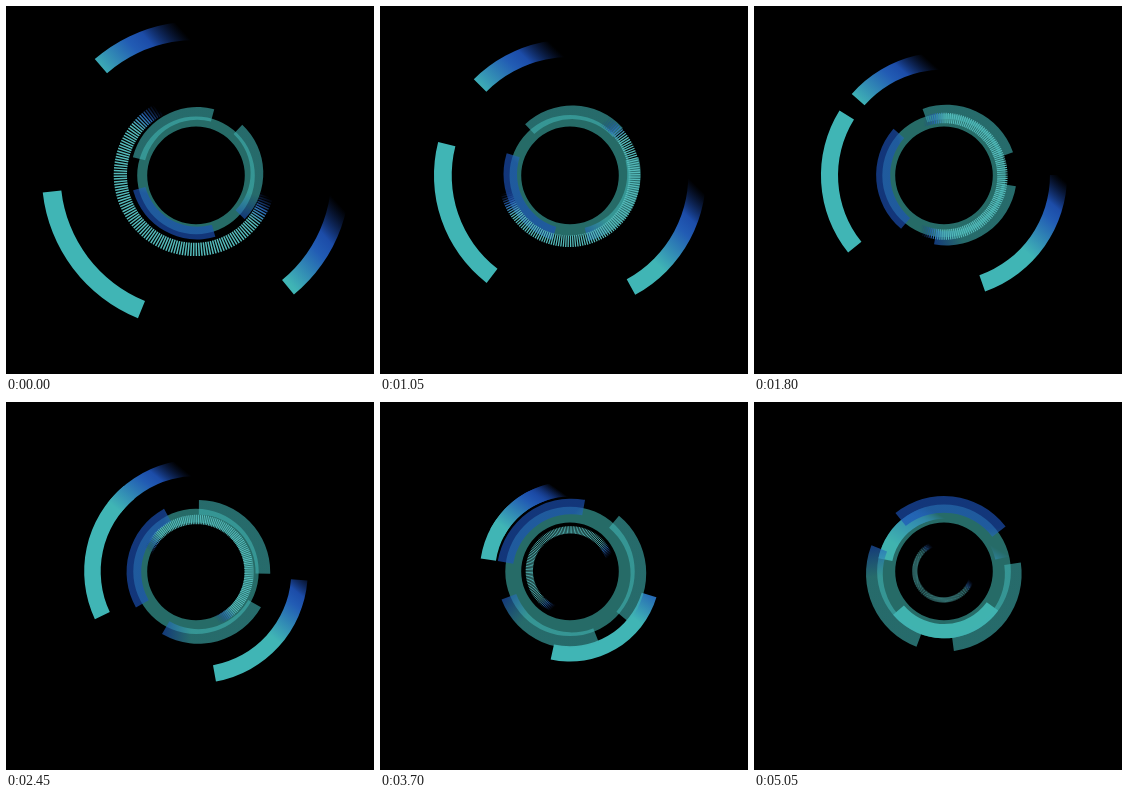
An HTML page with a canvas that plays this animation: 368 px wide and 368 px high, repeating every 5.1 s.

```html
<!DOCTYPE html>
<html lang="en">
<head>
<meta charset="utf-8">
<title>Rotating rings</title>
<style>
  html, body { margin: 0; width: 100%; height: 100%; overflow: hidden; background: #000; }
  canvas { display: block; width: 368px; height: 368px; }
</style>
</head>
<body>
<canvas id="stage" width="368" height="368"></canvas>
<script>
const ctx = document.getElementById('stage').getContext('2d');
const LOOP = 5100, STEP = 50;
const CX = 190, CY = 169.4;
const rad = deg => deg * Math.PI / 180;

// Linear gradient along an axis through the centre; stops are [fraction of r, colour].
function axisGradient(deg, r, stops) {
  const x = Math.cos(rad(deg)) * r, y = Math.sin(rad(deg)) * r;
  const g = ctx.createLinearGradient(-x, -y, x, y);
  for (const [at, colour] of stops) g.addColorStop((at + 1) / 2, colour);
  return g;
}

function band(inner, outer, from, to, fill) {
  ctx.beginPath();
  ctx.arc(0, 0, outer, rad(from), rad(to));
  ctx.arc(0, 0, inner, rad(to), rad(from), true);
  ctx.closePath();
  ctx.fillStyle = fill;
  ctx.fill();
}

// Three opaque arcs that shrink while their span widens.
function outerArcs(t) {
  const outer = 154.2 - 17.3 * t, inner = 135.5 - 16.4 * t;
  const mid = (outer + inner) / 2;
  const span = 61.5 * Math.pow(145 / mid, 0.59);
  const start = -72.5 + 0.9 * t;
  const fade = 0.6 + 0.035 * t;
  const fill = axisGradient(-42 - 3.5 * t, mid, [
    [-0.02, 'rgb(64,181,181)'],
    [fade - 0.33, 'rgb(34,92,180)'],
    [fade - 0.22, 'rgb(28,76,168)'],
    [fade, 'rgba(18,50,130,0)']
  ]);
  for (const from of [start + span, start + 3 * span, start + 363 - span]) {
    band(inner, outer, from, from + span, fill);
  }
}

// Three translucent arcs turning slightly off centre.
function middleArcs(t) {
  const outer = 66.2 + 2.3 * t, inner = 53.5 + 1.5 * t;
  ctx.save();
  ctx.rotate(rad(31.2 * t));
  ctx.translate(1.1, -2.2);
  const fill = axisGradient(105, outer, [
    [0.08, 'rgba(64,178,178,.6)'],
    [0.5, 'rgba(28,82,185,.66)']
  ]);
  for (const from of [74, 194, 313]) band(inner, outer, from, from + 91, fill);
  ctx.restore();
}

function baseRing(t) {
  ctx.beginPath();
  ctx.arc(0, 0, 58.8 + 1.6 * t, 0, 2 * Math.PI);
  ctx.arc(0, 0, 48.8, 0, 2 * Math.PI, true);
  ctx.fillStyle = 'rgba(64,178,172,.6)';
  ctx.fill();
}

function tickRing(t) {
  const scale = 1 - 0.1215 * t, step = 2;
  ctx.save();
  ctx.rotate(rad(-70.6 * t));
  ctx.scale(scale, scale);
  ctx.translate(-1, -0.6);
  ctx.beginPath();
  for (let a = 15; a < 243; a += step) {
    const c = Math.cos(rad(a)), s = Math.sin(rad(a));
    ctx.moveTo(68 * c, 68 * s);
    ctx.lineTo(81.3 * c, 81.3 * s);
  }
  ctx.lineWidth = 1.5;
  ctx.strokeStyle = axisGradient(-51.5, 75, [
    [0, 'rgb(84,186,186)'],
    [0.19, 'rgb(40,100,176)'],
    [0.38, 'rgba(20,50,130,0)']
  ]);
  ctx.stroke();
  ctx.restore();
}

function draw(now) {
  const t = Math.floor((now % LOOP) / STEP) * STEP / 1000;
  ctx.setTransform(1, 0, 0, 1, 0, 0);
  ctx.fillStyle = '#000';
  ctx.fillRect(0, 0, 368, 368);
  ctx.translate(CX, CY);
  outerArcs(t);
  baseRing(t);
  middleArcs(t);
  tickRing(t);
}

const begin = performance.now();
function tick() {
  draw(performance.now() - begin);
  requestAnimationFrame(tick);
}
tick();
</script>
</body>
</html>
```
